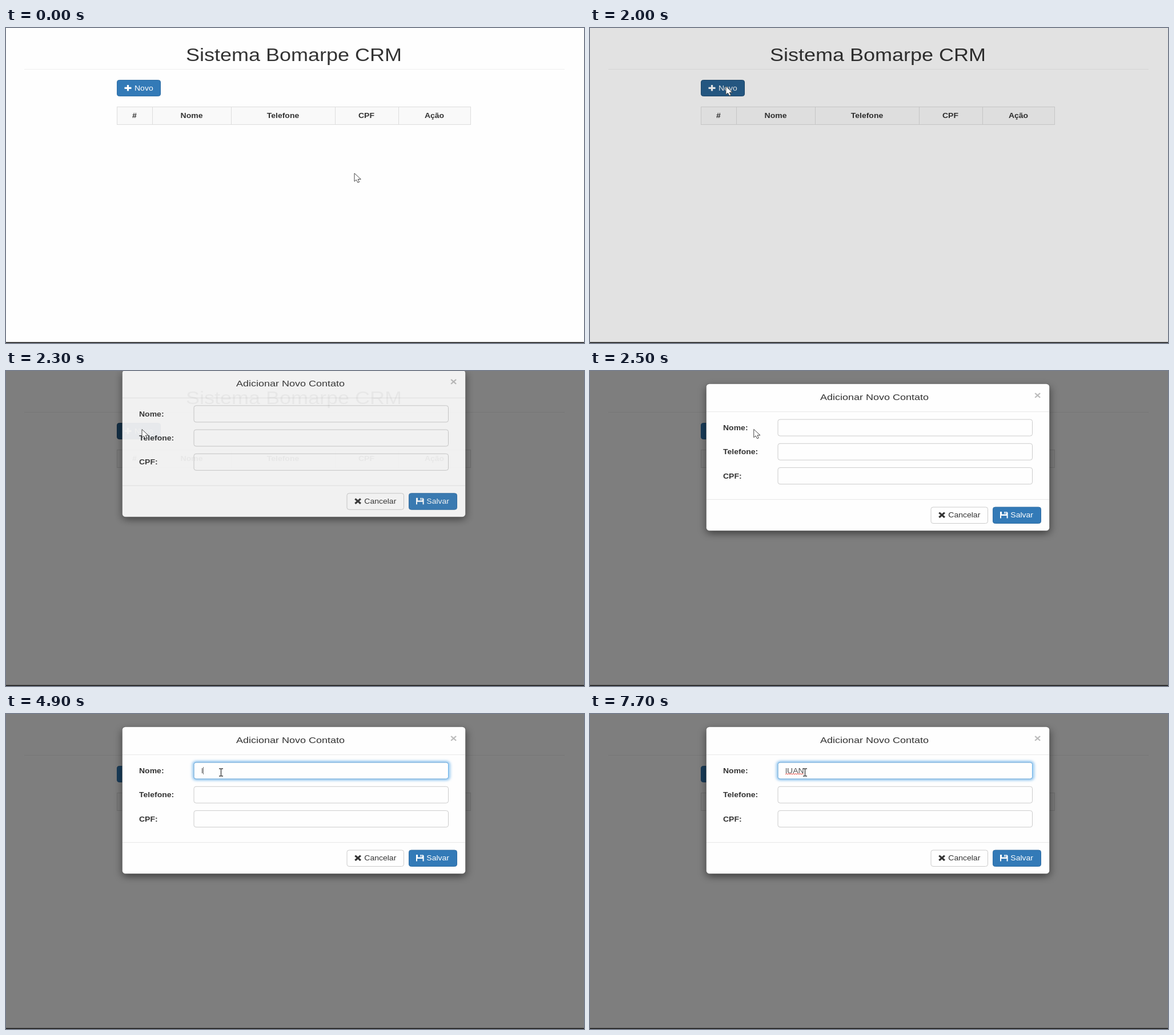
Write an HTML page that moves like this. It is 1012 px wide and 553 px high and loops after 8 s.

```html
<!DOCTYPE html>
<html lang="pt-BR">
<head>
<meta charset="utf-8">
<title>Contatos</title>
<style>
html, body { margin: 0; width: 100%; height: 100%; overflow: hidden; background: #fefefe; }
svg { display: block; width: 100%; height: 100%; }
text { font-family: "Liberation Sans", Arial, sans-serif; font-size: 14px; fill: #333; }
.bold { font-weight: bold; }
.mid { text-anchor: middle; }
</style>
</head>
<body>
<svg id="stage" viewBox="0 0 1012 553" preserveAspectRatio="none"></svg>
<script>
const LOOP = 8000, STEP = 100;
const SQUASH = 0.864;
const NAME = 'lUAN';
const TYPED_AT = [4900, 5100, 5600, 6100];
const CARET_ON = [[3100, 3800], [4300, 6600], [7100, 7700]];
const CURSOR_PATH = [
  [0, 610, 255], [800, 254, 99], [1000, 246, 101], [1100, 239, 103.5],
  [2000, 238, 102.5], [2300, 238, 102.5], [2800, 376.5, 102]
];

const label = (x, y, str, cls = '', attrs = '') =>
  `<text transform="translate(${x} ${y}) scale(1 ${SQUASH})" class="${cls}" ${attrs}>${str}</text>`;
const box = (x, y, w, h, r, fill, stroke, attrs = '') =>
  `<rect x="${x}" y="${y}" width="${w}" height="${h}" rx="${r}" ry="${r * SQUASH}" fill="${fill}" stroke="${stroke}" ${attrs}/>`;
const line = (d, color) => `<path d="${d}" fill="none" stroke="${color}"/>`;

const columns = [
  ['#', 225], ['Nome', 325], ['Telefone', 485], ['CPF', 631], ['Ação', 750]
];
const fields = [['Nome:', 85], ['Telefone:', 127.3], ['CPF:', 169.6]];

const page = `
  <rect width="1012" height="553" fill="#fefefe"/>
  ${label(504, 58.3, 'Sistema Bomarpe CRM', 'mid', 'style="font-size:36px"')}
  ${line('M32 72.5H978', '#eee')}
  ${box(194.5, 91.5, 76, 28, 4, '#337ab7', '#2e6da4', 'id="newBtn"')}
  <path d="M207.5 105.3H219.5M213.5 100V110.6" stroke="#fff" stroke-width="3.2"/>
  ${label(225, 109.7, 'Novo', '', 'style="fill:#fff"')}
  ${box(194.5, 138.5, 619, 31, 0, '#f9f9f9', '#ddd')}
  ${line('M256.5 138V170M394.5 138V170M576.5 138V170M687.5 138V170', '#ddd')}
  ${columns.map(([s, x]) => label(x, 158, s, 'bold mid')).join('')}`;

const modal = `
  <rect x="204" y="27.3" width="601" height="258" rx="6" filter="url(#shade)" opacity=".5"/>
  ${box(203.5, 22.5, 601, 258, 6, '#fefefe', '#000', 'stroke-opacity=".25"')}
  ${label(498, 50.8, 'Adicionar Novo Contato', 'mid', 'style="font-size:18px"')}
  ${label(783.5, 49, '×', 'bold mid', 'style="font-size:21px;fill:#bbb"')}
  ${line('M204 71.5H804M204 225.5H804', '#e8e8e8')}
  <g id="glow" opacity="0">
    ${box(329, 85, 446, 29, 4, 'none', '#66afe9', 'stroke-width="5" filter="url(#halo)" opacity=".8"')}
  </g>
  ${fields.map(([s, y]) => label(233, y + 19, s, 'bold') +
    box(329, y, 445.5, 29, 4, '#fefefe', '#ccc')).join('')}
  <g id="focus" opacity="0">${box(329, 85, 445.5, 29, 4, 'none', '#66afe9')}</g>
  ${label(342, 104, '', '', 'id="typed" style="fill:#555"')}
  <path id="squiggle" fill="none" stroke="#e8453c"/>
  <path id="caret" d="M0 93V106" stroke="#777"/>
  ${box(597, 239, 99.5, 28.5, 4, '#fefefe', '#ccc')}
  <path d="M611.3 248.6L620.9 257M620.9 248.6L611.3 257" stroke="#333" stroke-width="3.2"/>
  ${label(627.3, 257.4, 'Cancelar')}
  ${box(705.5, 239, 84, 28.5, 4, '#337ab7', '#2e6da4')}
  <path d="M718 247h3v4.6h7.6v-4.6h1l2 1.8v9.7h-2v-4.4h-9.6v4.4h-2zM725.5 247h2v3.4h-2z" fill="#fff"/>
  ${label(736.3, 257.4, 'Salvar', '', 'style="fill:#fff"')}`;

const cursors = `
  <path id="arrow" d="M0 0V14.3L3.4 11.5L6 16.4L8.6 15.3L6.2 10.5H11.3Z" fill="#fff" stroke="#444"/>
  <path id="hand" d="M-1.7 12V1.3Q0-.8 1.7 1.3V6.4Q3.2 5.4 4.2 7Q5.8 6 6.8 7.6Q9 7.2 9 9.5V13L7.4 17V19H-1V17L-5.2 11.6Q-4.6 8.8-1.7 11.5Z" fill="#fff" stroke="#222"/>
  <path id="beam" d="M-3.5-6H-1L0-5.2L1-6H3.5M0-5.2V6M-3.5 7H-1L0 6L1 7H3.5" fill="none" stroke="#444" stroke-width="1.4"/>`;

document.getElementById('stage').innerHTML = `
  <defs>
    <filter id="shade" x="-10%" y="-20%" width="120%" height="140%"><feGaussianBlur stdDeviation="7.5 6.5"/></filter>
    <filter id="halo" x="-5%" y="-60%" width="110%" height="220%"><feGaussianBlur stdDeviation="2.6 2.2"/></filter>
  </defs>
  ${page}
  <rect id="shadeAll" width="1012" height="553" opacity="0"/>
  <g id="modal" opacity="0">${modal}</g>
  <g id="cursor">${cursors}</g>
  <rect y="551.4" width="1012" height="1.6" fill="#1c1c1c"/>`;

const el = {};
document.querySelectorAll('svg [id]').forEach(n => { el[n.id] = n; });
const set = (id, attrs) => {
  for (const k in attrs) el[id].setAttribute(k, attrs[k]);
};
const show = (id, on) => set(id, { visibility: on ? 'visible' : 'hidden' });
const ramp = (t, start, length) => Math.min(1, Math.max(0, (t - start) / length));
const smooth = p => p * p * (3 - 2 * p);
const easeOut = p => 1 - Math.pow(1 - p, 1.7);

function cursorAt(t) {
  let i = 0;
  while (i < CURSOR_PATH.length - 2 && t >= CURSOR_PATH[i + 1][0]) i++;
  const [t0, x0, y0] = CURSOR_PATH[i], [t1, x1, y1] = CURSOR_PATH[i + 1];
  const p = smooth(ramp(t, t0, t1 - t0));
  return [x0 + (x1 - x0) * p, y0 + (y1 - y0) * p];
}

function wave(x, width, y) {
  let d = `M${x} ${y}`;
  for (let i = 2; i <= width; i += 2) d += `L${x + i} ${y + (i % 4 ? -1.4 : 0)}`;
  return d;
}

function draw(ms) {
  const t = Math.floor(ms / STEP) * STEP;

  const [x, y] = cursorAt(t);
  const onBtn = x > 194 && x < 271 && y > 91 && y < 120;
  const hand = t < 2000 && onBtn;
  const beam = t > 2300 && x >= 329;
  set('cursor', { transform: `translate(${x} ${y})` });
  show('hand', hand);
  show('beam', beam);
  show('arrow', !hand && !beam);

  const hover = onBtn && t < 2400;
  set('newBtn', { fill: hover ? '#286090' : '#337ab7', stroke: hover ? '#204d74' : '#2e6da4' });

  set('shadeAll', { opacity: 0.5 * ramp(t, 1967, 150) });
  const drop = -67 * (1 - easeOut(ramp(t, 2165, 300)));
  set('modal', { opacity: ramp(t, 2165, 150), transform: `translate(0 ${drop})` });

  const focus = ramp(t, 3050, 150);
  set('glow', { opacity: focus });
  set('focus', { opacity: focus });

  el.typed.textContent = NAME.slice(0, TYPED_AT.filter(at => t >= at).length);
  const width = el.typed.textContent ? el.typed.getComputedTextLength() : 0;
  set('caret', { transform: `translate(${Math.floor(342 + width) + 0.5} 0)` });
  show('caret', CARET_ON.some(([a, b]) => t >= a && t < b));
  set('squiggle', { d: t >= 7100 ? wave(342, width, 106) : '' });
}

const start = performance.now();
function tick() {
  draw((performance.now() - start) % LOOP);
  requestAnimationFrame(tick);
}
tick();
</script>
</body>
</html>
```
